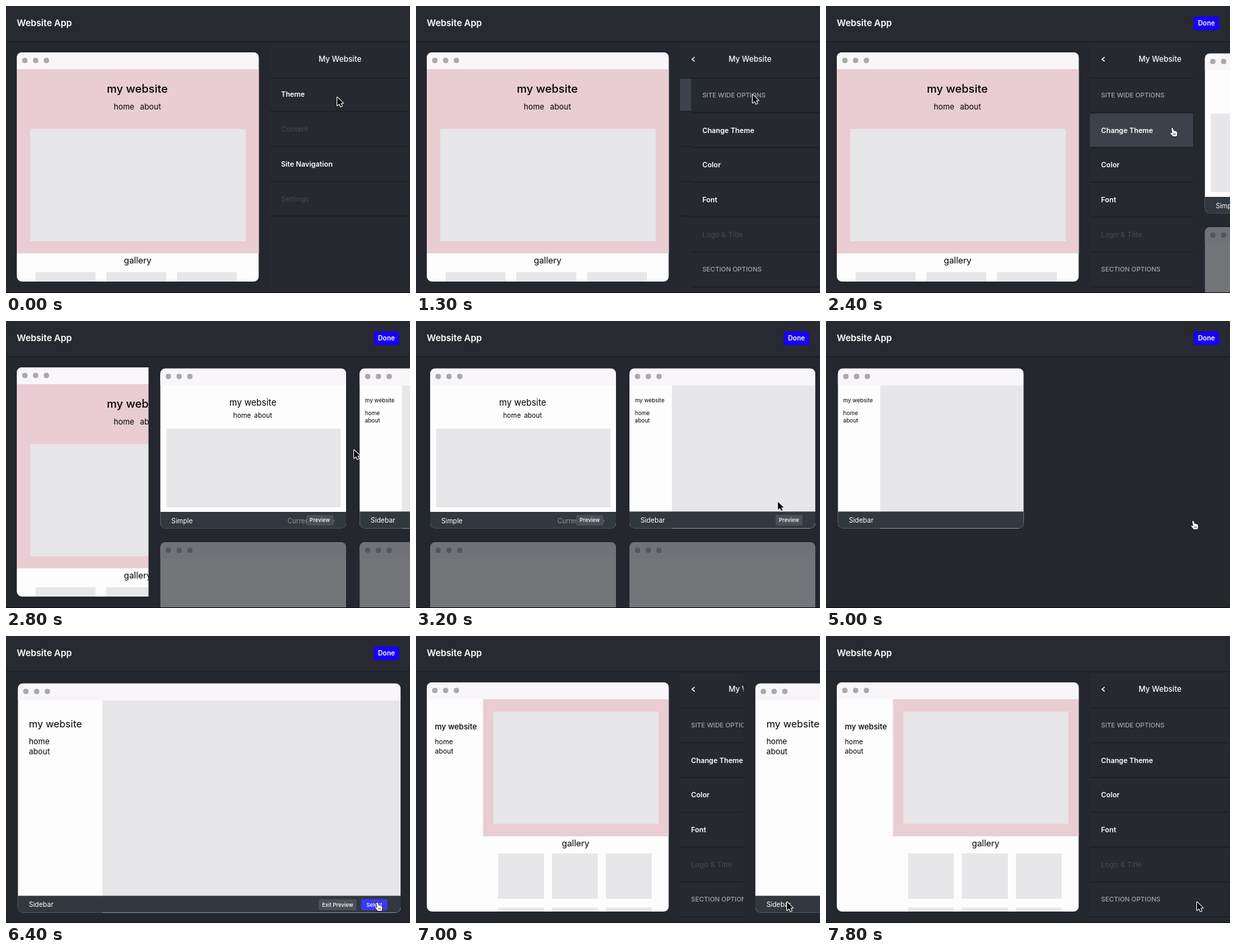
Animation, 600 px wide and 427 px high, one loop 7.9 s. Source, as an HTML page with a canvas:

```html
<!DOCTYPE html>
<html lang="en">
<head>
<meta charset="utf-8">
<title>Website App</title>
<style>
html, body { margin: 0; width: 100%; height: 100%; overflow: hidden; background: #24272d; }
canvas { display: block; }
</style>
</head>
<body>
<canvas id="stage" width="600" height="427"></canvas>
<script>
const ctx = document.getElementById('stage').getContext('2d');
const LOOP = 7900, STEP = 100;
const BG = '#24272d', PANEL = '#26292f', LINE = '#1b1e23', HOVER = '#3c414b';
const GRAY = '#e7e6e8', PINK = '#e9cdd3', BLUE = '#1700f5', FOOT = '#32383f';

const clamp = u => Math.min(1, Math.max(0, u));
const ramp = (t, from, to) => clamp((t - from) / (to - from));
const ease = u => u < .5 ? 2 * u * u : 1 - 2 * (1 - u) ** 2;
const glide = (t, from, to) => ease(ramp(t, from, to));
const mix = (a, b, u) => a + (b - a) * u;

function box(x, y, w, h, color) {
  ctx.fillStyle = color;
  ctx.fillRect(x, y, w, h);
}

function round(x, y, w, h, r, color) {
  ctx.beginPath();
  ctx.roundRect(x, y, w, h, r);
  ctx.fillStyle = color;
  ctx.fill();
}

// y is the middle of the capitals
function text(str, x, y, size, color = '#fff', weight = 400, align = 'left') {
  ctx.font = `${weight} ${size}px Inter, "Open Sans", sans-serif`;
  ctx.textAlign = align;
  ctx.fillStyle = color;
  ctx.fillText(str, x, y + size * .36);
}

function clipped(x, y, w, h, r, draw) {
  ctx.save();
  ctx.beginPath();
  ctx.roundRect(x, y, w, h, r);
  ctx.clip();
  draw();
  ctx.restore();
}

function browser(x, y, w, h, draw) {
  clipped(x, y, w, h, 8, () => {
    box(x, y, w, h, '#fefdfe');
    box(x, y, w, 25, '#f8f6f8');
    for (let i = 0; i < 3; i++) {
      ctx.beginPath();
      ctx.arc(x + 12 + 16 * i, y + 12, 4, 0, 7);
      ctx.fillStyle = '#a9a8ab';
      ctx.fill();
    }
    draw();
  });
}

function veil(x, y, w, h, amount) {
  ctx.globalAlpha = amount;
  box(x - 1, y - 1, w + 2, h + 2, BG);
  ctx.globalAlpha = 1;
}

function editor(sidebar) {
  browser(16, 69, 359.5, 341, () => {
    if (sidebar) {
      box(99.5, 94, 276, 204, PINK);
      box(115, 112.5, 245, 167, GRAY);
      text('my website', 28, 135, 11.5, '#000', 500);
      text('home', 28, 157.5, 10.2, '#000');
      text('about', 28, 171, 10.2, '#000');
      text('gallery', 237, 308, 12.8, '#000', 400, 'center');
      for (let i = 0; i < 6; i++)
        box(122 + 80 * (i % 3), i < 3 ? 323.5 : 404, 68, 67.5, GRAY);
    } else {
      box(16, 94, 360, 274, PINK);
      box(36, 183, 320, 167, GRAY);
      text('my website', 195, 123, 16.6, '#000', 500, 'center');
      text('home', 160, 150, 11.5, '#000');
      text('about', 199, 150, 11.6, '#000');
      text('gallery', 195.5, 378.5, 12.8, '#000', 400, 'center');
      for (let i = 0; i < 3; i++) box(44 + 105 * i, 396, 89, 20, GRAY);
    }
  });
}

function rows(items, dx, top, gap, hovered) {
  items.forEach(([label, kind], i) => {
    const y = top + gap * i;
    if (label === hovered) box(392 + dx, y - 25, 208, 50, HOVER);
    box(392 + dx, y + 25, 208, 1.5, LINE);
    if (kind === 'head') text(label, 408.5 + dx, y, 9.6, '#a3a5a9', 500);
    else if (kind === 'off') text(label, 408.5 + dx, y, 10.8, '#484b51');
    else text(label, 408.5 + dx, y, 10.5, '#fff', 600);
  });
}

const MENU = [['Theme'], ['Content', 'off'], ['Site Navigation'], ['Settings', 'off']];
const SUBMENU = [['SITE WIDE OPTIONS', 'head'], ['Change Theme'], ['Color'], ['Font'],
  ['Logo & Title', 'off'], ['SECTION OPTIONS', 'head']];

function panel(t) {
  const u = glide(t, 900, 1400);
  clipped(392, 54, 208, 373, 0, () => {
    box(392, 54, 208, 373, PANEL);
    if (u < 1) rows(MENU, -208 * u, 131.5, 51.8, t >= 300 ? 'Theme' : '');
    if (u > 0) rows(SUBMENU, 208 * (1 - u), 133, 51.8, t >= 1700 && t < 5000 ? 'Change Theme' : '');
    box(392, 106.5, 208, 1.5, LINE);
    text('My Website', 496, 79, 11.3, '#fff', 500, 'center');
    if (u > 0) {
      ctx.globalAlpha = u;
      ctx.strokeStyle = '#fff';
      ctx.lineWidth = 1.5;
      ctx.stroke(new Path2D('M413.8 76L410 79.2L413.8 82.4'));
      ctx.globalAlpha = 1;
    }
  });
}

function button(label, x, y, w, h, color, alpha = 1) {
  ctx.globalAlpha = alpha;
  round(x, y, w, h, 2, color);
  text(label, x + w / 2, y + h / 2, 7.9, '#fff', 500, 'center');
  ctx.globalAlpha = 1;
}

function simpleCard(x) {
  browser(x, 70.5, 276, 238, () => {
    text('my website', x + 137.5, 121, 13, '#000', 400, 'center');
    text('home', x + 108.5, 140.5, 9.9, '#000');
    text('about', x + 139.5, 140.5, 9.9, '#000');
    box(x + 9, 160, 259, 117, GRAY);
    box(x, 284, 276, 25, FOOT);
    text('Simple', x + 16.5, 297, 9.9);
    text('Current Theme', x + 189, 297, 9.8, '#8f9399');
  });
  button('Preview', x + 217, 288.5, 40, 16, '#4a4f58');
}

function sidebarCard(x, u, fade) {
  const w = mix(276, 568.5, u), h = mix(238, 341, u), bottom = 70.5 + h;
  const left = x + mix(8, 16.5, u), small = mix(8.3, 11.6, u);
  browser(x, 70.5, w, h, () => {
    const split = mix(63, 125.5, u);
    box(x + split, 96, w - split, h, GRAY);
    text('my website', left, mix(118, 131, u), mix(8.2, 14.7, u), '#000');
    text('home', left, mix(137, 157, u), small, '#000');
    text('about', left, mix(148, 172, u), small, '#000');
    box(x, bottom - 25, w, 25, FOOT);
    text('Sidebar', x + 16.5, bottom - 12, 10);
  });
  if (fade > 0) button('Preview', x + 217, 288.5, 40, 16, '#4a4f58', fade);
}

function chooser(t) {
  const shift = 600 * (t < 5000 ? 1 - glide(t, 2166, 3259) : glide(t, 6550, 7200));
  if (shift >= 600) return;
  box(shift, 54, 600, 373, BG);
  const x = shift + 17.5;
  const fade = 1 - ramp(t, 4200, 4500);
  if (fade > 0) {
    simpleCard(x);
    veil(x, 70, 276, 239, 1 - fade);
    for (const cx of [x, x + 296]) {
      browser(cx, 329, 276, 238, () => {});
      veil(cx, 329, 276, 98, 1 - .37 * fade);
    }
  }
  const move = glide(t, 4500, 4950), grow = glide(t, 5100, 5700);
  sidebarCard(x + 296 * (1 - move), grow, fade);
  const shown = ramp(t, 5600, 5900);
  if (shown > 0) {
    button('Exit Preview', x + 447, 391.5, 56, 16.5, '#4a4f58', shown);
    button('Select', x + 510, 391.5, 39, 16.5, t >= 6100 ? '#3b38fb' : BLUE, shown);
  }
}

function header(t) {
  box(0, 0, 600, 53, '#272a30');
  box(0, 52.5, 600, 1.5, LINE);
  text('Website App', 16, 25, 13.3, '#fff', 600);
  const alpha = ramp(t, 2000, 2300) * (1 - ramp(t, 6550, 6850));
  ctx.globalAlpha = alpha;
  round(546, 15.5, 38, 20.5, 3, BLUE);
  text('Done', 565, 25.5, 9.9, '#fff', 600, 'center');
  ctx.globalAlpha = 1;
}

const ARROW = new Path2D('M0 0V12L3 9.3L5 13.6L7 12.7L5 8.6H8.8Z');
const HAND = new Path2D('M-1 1.2Q0-.4 1.2 1L2.5 4.5L6.5 5.6Q8 6.4 7.6 9L7 13H1.2L-2.6 8.8Q-3 7.4-1.4 7.6L.3 8.6Z');
// start, end, x, y
const MOVES = [[100, 500, 500, 132], [1400, 1900, 514, 181], [2600, 3520, 545, 297], [5600, 6200, 551, 396]];
// spans with the pointing hand
const HANDS = [[300, 900], [1700, 2600], [3400, 5600], [6100, 6700]];

function cursor(t) {
  let x = 492, y = 136;
  for (const [from, to, nx, ny] of MOVES) {
    const u = glide(t, from, to);
    x = mix(x, nx, u);
    y = mix(y, ny, u);
  }
  const hand = HANDS.some(([from, to]) => t >= from && t < to);
  const shape = hand ? HAND : ARROW;
  ctx.save();
  ctx.translate(x, y);
  ctx.lineJoin = 'round';
  ctx.lineWidth = hand ? 1.2 : 2;
  ctx.strokeStyle = hand ? '#000' : '#fff';
  ctx.fillStyle = hand ? '#fff' : '#000';
  ctx.stroke(shape);
  ctx.fill(shape);
  if (hand) {
    ctx.lineWidth = .7;
    ctx.stroke(new Path2D('M2.6 8.5V11M4.6 8.5V11'));
  }
  ctx.restore();
}

function draw(t) {
  box(0, 0, 600, 427, BG);
  editor(t >= 5000);
  panel(t);
  chooser(t);
  header(t);
  box(0, 426, 600, 1, '#0c0d10');
  cursor(t);
}

const start = performance.now();
function tick() {
  const t = (performance.now() - start) % LOOP;
  draw(Math.floor(t / STEP) * STEP);
  requestAnimationFrame(tick);
}
tick();
</script>
</body>
</html>
```
